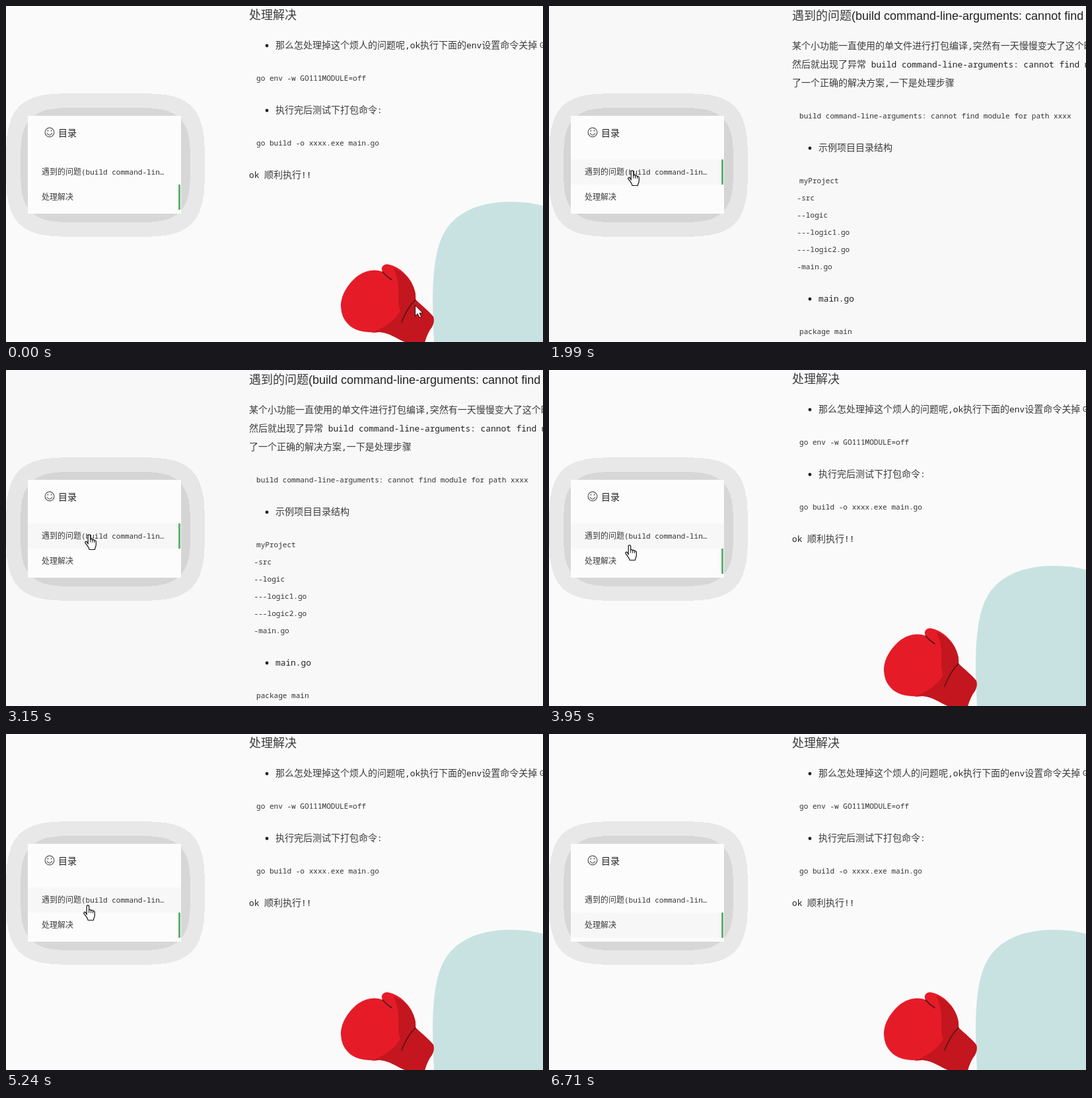
These frames come from a looping animation (813 by 508 pixels, 8.87 s). An HTML page:

```html
<!DOCTYPE html>
<html lang="zh-CN">
<head>
<meta charset="utf-8">
<title>目录</title>
<style>
  html, body { margin: 0; width: 100%; height: 100%; overflow: hidden; background: #fafafa; }
  svg { display: block; width: 100%; height: 100%; }
  text { white-space: pre; fill: #222; font-family: "Noto Sans Mono", "Liberation Mono", monospace; }
  .cjk { fill: #3c3c3c; font-family: "Noto Sans CJK SC", "Noto Sans CJK", sans-serif; font-weight: 300; }
  .head { font-family: "Liberation Sans", Arial, sans-serif; }
  .code { fill: #333; }
  .bold .cjk { fill: #222; font-weight: 500; }
</style>
</head>
<body>
<svg viewBox="0 0 813 508" preserveAspectRatio="xMinYMin slice">
  <!-- A wide blurred shadow cut into two flat bands -->
  <filter id="bands" filterUnits="userSpaceOnUse" x="-100" y="50" width="500" height="400">
    <feGaussianBlur stdDeviation="25"/>
    <feComponentTransfer>
      <feFuncA type="discrete" tableValues="0 .072 .072 .072 .144 .144 .144 .144 .144 .144 .144 .144 .144"/>
    </feComponentTransfer>
  </filter>

  <rect id="paper" width="813" height="508"/>
  <rect x="34.5" y="166.5" width="232" height="148" filter="url(#bands)"/>
  <rect x="33" y="166" width="232" height="148" fill="#fcfcfc"/>
  <rect id="hover" x="33" width="232" height="38" fill="#f7f7f7"/>
  <rect id="mark" x="261" width="3" height="38" fill="#5fb26f"/>
  <g fill="none" stroke="#555" stroke-width="1.2">
    <circle cx="66" cy="191" r="6.9"/>
    <path d="M62.3 192.5Q66 198 69.7 192.5" stroke-linecap="round"/>
    <path d="M63.4 187.6v2M68.6 187.6v2" stroke-width="1.5"/>
  </g>
  <g id="menu"></g>

  <g id="problem"></g>
  <g id="solution">
    <path d="M648 508C645 450 643 385 661 347C678 312 716 296 765 296Q791 296 813 302V508Z" fill="#c8e2e2"/>
    <path d="M507 455C506 439 517 421 530 410C543 400 557 397 570 402C566 394 573 389 580 391C596 394 612 410 617 425Q621 435 620 444C628 452 639 460 647 470Q649 478 645 485Q638 494 634 508H604C592 503 580 494 566 493C548 494 528 493 517 480Q508 471 507 455Z" fill="#e51c28"/>
    <path d="M586 396C601 401 613 414 617 425Q621 435 620 444C628 452 639 460 647 470Q649 478 645 485Q638 494 634 508H604C592 503 580 494 566 493L553 494C576 486 590 473 597 461C590 446 600 420 586 396Z" fill="#c3161f"/>
    <path d="M570 402Q576 409 584 414M620 444Q608 455 599 478" fill="none" stroke="#4a1518" stroke-width="1.5" stroke-linecap="round"/>
  </g>

  <g id="cursor" fill="#fff" stroke="#111" stroke-linejoin="round">
    <path id="arrow" d="M.5 .7V16.6L4.3 13.2L6.9 19L9.6 17.8L7 12.2H12Z"/>
    <g id="hand">
      <path stroke-width="1.2" d="M5.2 15V2.7C5.2 .2 8.7 .2 8.7 2.7V8.4C9.4 7 11.5 7.3 11.7 9C12.6 7.9 14.5 8.3 14.6 10C15.6 9.2 17.3 9.8 17.3 11.6V16.4C17.3 19 15.6 20 15.4 23.5H7.1C6.6 20 3.6 17.3 1.2 13.7C-.1 11.7 2.2 10.3 3.6 12Z"/>
      <path fill="none" d="M8.7 8.4v4.2M11.7 9v3.8M14.6 10v3"/>
    </g>
  </g>
</svg>
<script>
const LOOP = 8870;
const STEP = 144;    // the pointer is seen only at this interval
const LEAVE = 6710;  // the pointer is gone from here on
const ROW = 38;
const NS = "http://www.w3.org/2000/svg";
const $ = id => document.getElementById(id);

function make(parent, tag, attrs) {
  const el = parent.appendChild(document.createElementNS(NS, tag));
  for (const key in attrs) el.setAttribute(key, attrs[key]);
  return el;
}

// Chinese and Latin runs have their own sizes.
function write(parent, x, y, str, latin, cjk, cls = "") {
  const line = make(parent, "text", { x, y, class: cls, "font-size": latin });
  for (const run of str.match(/[\u4e00-\u9fff]+|[^\u4e00-\u9fff]+/g)) {
    const isCjk = /[\u4e00-\u9fff]/.test(run);
    const span = make(line, "tspan", isCjk ? { class: "cjk", "font-size": cjk } : {});
    span.textContent = run;
  }
}

const heading = (g, y, str) => write(g, 368, y, str, 18, 18, "head");
const para = (g, x, y, str) => write(g, x, y, str, 12.83, 14);
const code = (g, x, y, str) => write(g, x, y, str, 11.07, 12, "code");
function bullet(g, y, str) {
  make(g, "circle", { cx: 395, cy: y - 4, r: 2.4, fill: "#222" });
  para(g, 408, y, str);
}

const menu = $("menu"), problem = $("problem"), solution = $("solution");

write(menu, 79, 197, "目录", 14, 14, "bold");
["遇到的问题(build command-lin…", "处理解决"]
  .forEach((str, i) => write(menu, 54, 255 + ROW * i, str, 11, 12, "code"));

heading(problem, 21, "遇到的问题(build command-line-arguments: cannot find");
[
  "某个小功能一直使用的单文件进行打包编译,突然有一天慢慢变大了这个时",
  "然后就出现了异常 build command-line-arguments: cannot find m",
  "了一个正确的解决方案,一下是处理步骤"
].forEach((str, i) => para(problem, 368, 65 + 28 * i, str));
code(problem, 379, 170, "build command-line-arguments: cannot find module for path xxxx");
bullet(problem, 219, "示例项目目录结构");
code(problem, 379, 268, "myProject");
["-src", "--logic", "---logic1.go", "---logic2.go", "-main.go"]
  .forEach((name, i) => code(problem, 375.6, 294 + 26 * i, name));
bullet(problem, 447, "main.go");
code(problem, 379, 496, "package main");

heading(solution, 20, "处理解决");
bullet(solution, 64, "那么怎处理掉这个烦人的问题呢,ok执行下面的env设置命令关掉");
code(solution, 808, 63, "GO");
code(solution, 379, 113, "go env -w GO111MODULE=off");
bullet(solution, 162, "执行完后测试下打包命令:");
code(solution, 379, 211, "go build -o xxxx.exe main.go");
para(solution, 368, 260, "ok 顺利执行!!");

const entry = { x: 619, y: 452 };
const bend = { x: 420, y: 540 };
const items = [{ x: 119, y: 248 }, { x: 109, y: 289 }];

// The pointer swings between the two items; each swing ends in a click.
const swings = [
  { from: 120, to: 1130, click: 1990 },
  { from: 2270, to: 2610 },
  { from: 2610, to: 3150 },
  { from: 3270, to: 3540 },
  { from: 3540, to: 4550 },
  { from: 4550, to: 4830 },
  { from: 4830, to: 5520 },
  { from: 5520, to: 5670, click: 6440 }
];

const mix = (a, b, p) => ({ x: a.x + (b.x - a.x) * p, y: a.y + (b.y - a.y) * p });
const easeOut = p => 1 - (1 - p) ** 2;

function progress({ from, to }, t) {
  if (t >= to) return 1;
  const seen = (Math.floor((t - from) / STEP) + 1) * STEP;
  return easeOut(Math.min(1, seen / (to - from + STEP)));
}

function pointer(t) {
  const i = swings.findLastIndex(s => s.from <= t);
  if (i < 0) return entry;
  const p = progress(swings[i], t);
  if (i === 0) return mix(mix(entry, bend, p), mix(bend, items[0], p), p);
  return mix(items[(i + 1) % 2], items[i % 2], p);
}

function show(el, on) { el.style.display = on ? "" : "none"; }

function draw(t) {
  const { x, y } = pointer(t);
  const clicks = swings.filter(s => (s.click ?? s.to) <= t).length;
  const onProblem = clicks % 2 === 1;
  const overMenu = x < 255 && y >= 232 && y < 308;

  show(problem, onProblem);
  show(solution, !onProblem);
  $("paper").setAttribute("fill", onProblem ? "#f8f8f8" : "#fafafa");
  $("mark").setAttribute("y", onProblem ? 232 : 232 + ROW);

  show($("hover"), overMenu);
  $("hover").setAttribute("y", y < 270 ? 232 : 232 + ROW);

  show($("cursor"), t < LEAVE);
  show($("hand"), overMenu);
  show($("arrow"), !overMenu);
  $("cursor").setAttribute("transform", `translate(${Math.round(x)} ${Math.round(y)})`);
}

const start = performance.now();
function tick() {
  draw((performance.now() - start) % LOOP);
  requestAnimationFrame(tick);
}
tick();
</script>
</body>
</html>
```
